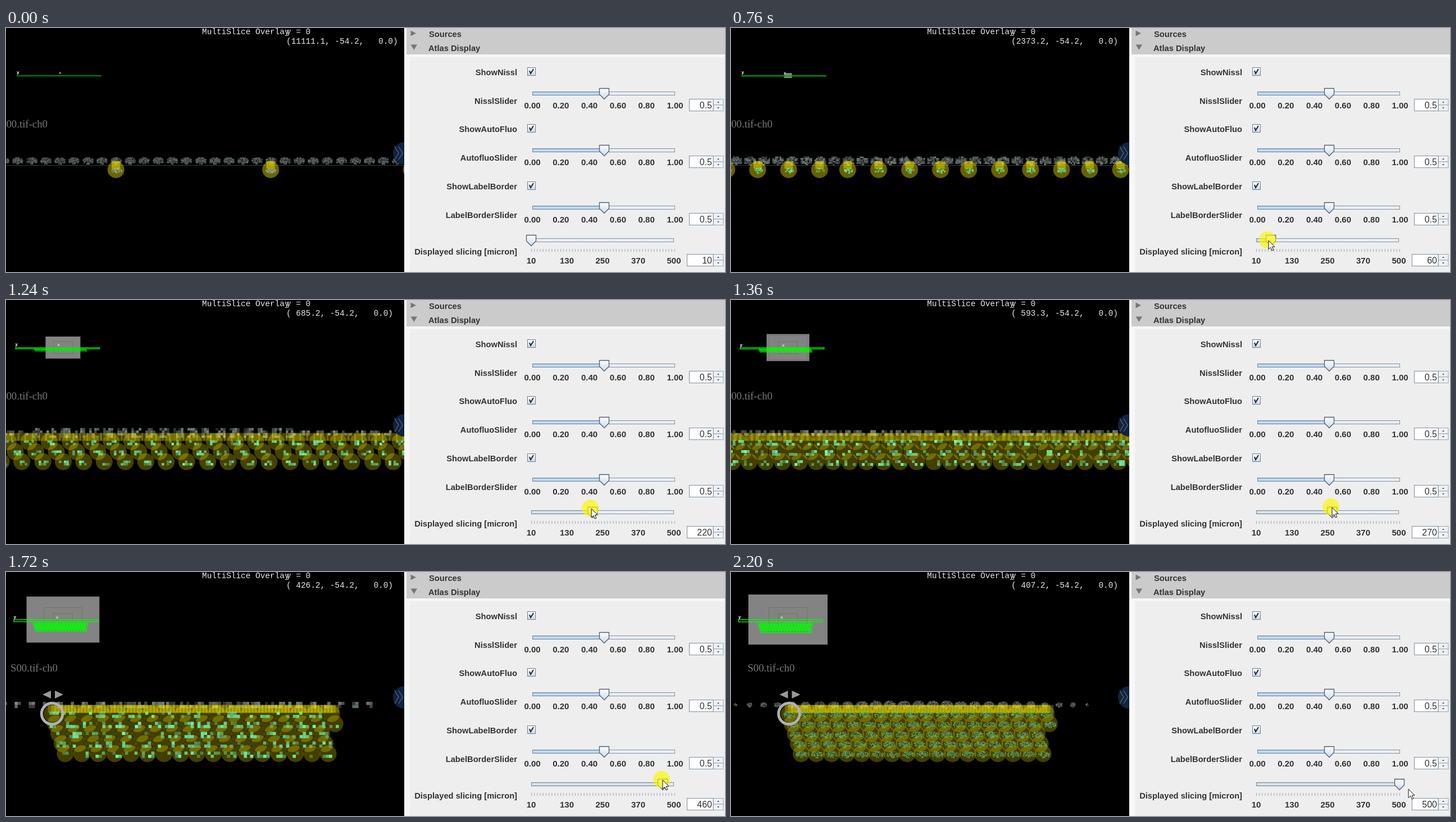
Animation of 1280 by 434 pixels, one loop 2.24 s. Source, as an HTML page with a canvas:

```html
<!DOCTYPE html>
<html lang="en">
<head>
<meta charset="utf-8">
<title>Slice spacing</title>
<style>
html, body { margin: 0; width: 100%; height: 100%; overflow: hidden; background: #fff; }
canvas, svg { position: absolute; left: 0; top: 0; display: block; }
text { white-space: pre; }
.mono { font: 14.4px "Liberation Mono", "Courier New", monospace; fill: #e8e8e8; }
.tiny { font: 8px "Liberation Mono", monospace; fill: #fff; }
.tag { font: 18.8px "Liberation Serif", "Times New Roman", serif; fill: #777; }
.bold { font: bold 14.7px "Liberation Sans", Arial, sans-serif; fill: #333; }
.tick { font: bold 15px "Liberation Sans", Arial, sans-serif; fill: #333; text-anchor: middle; }
.num { font: 16px "Liberation Sans", Arial, sans-serif; fill: #333; text-anchor: end; }
.end { text-anchor: end; }
</style>
</head>
<body>
<canvas id="view" width="710" height="434"></canvas>
<svg width="1280" height="434" viewBox="0 0 1280 434">
  <defs>
    <clipPath id="left"><rect width="710" height="434"/></clipPath>
    <linearGradient id="fill" x2="0" y2="1">
      <stop stop-color="#8fb2d6"/><stop offset=".5" stop-color="#cfe2f6"/><stop offset="1" stop-color="#a4c2e2"/>
    </linearGradient>
    <linearGradient id="pale" x2="0" y2="1">
      <stop stop-color="#b9c8cf"/><stop offset=".5" stop-color="#e3ebee"/><stop offset="1" stop-color="#b4c6cc"/>
    </linearGradient>
    <linearGradient id="face" x2="0" y2="1">
      <stop stop-color="#fff"/><stop offset="1" stop-color="#c6d8ea"/>
    </linearGradient>
    <path id="thumb" d="M-8.5-9.5H8.5V1L0 9.5L-8.5 1Z" fill="url(#face)" stroke="#53606e" stroke-width="1.3"/>
  </defs>
  <g clip-path="url(#left)">
    <text class="mono" x="349" y="11">MultiSlice Overlay</text>
    <text class="mono" x="499" y="11">y = 0</text>
    <text class="mono" x="499" y="28" id="pos"></text>
    <text class="tag" y="177" id="tag">S00.tif-ch0</text>
    <g class="tiny" id="axes"><text x="19" y="82">z</text><text x="19" y="81">y</text><text x="94" y="82">x</text></g>
    <g id="handle">
      <circle cy="252" r="18.7" fill="none" stroke="#b0b0b0" stroke-width="5"/>
      <path d="M-17 218l15-7v14zM20 218l-15-7v14z" fill="#999"/>
    </g>
    <circle cx="709" cy="223" r="20" fill="#11233f"/>
    <path d="M692 211l7 11.500-7 11.500M699 211l7 11.500-7 11.500" fill="none" stroke="#54637c" stroke-width="1.4"/>
  </g>
  <g id="panel"></g>
  <g id="mouse">
    <circle id="halo" cx="-2" cy="-1" r="15" fill="#fbf600" fill-opacity=".68"/>
    <path d="M0 0V15.500L3.700 12.200L6.200 18L8.800 16.900L6.300 11.200H11Z" fill="#fff" stroke="#111"/>
  </g>
</svg>
<script>
const $ = id => document.getElementById(id);
const g = $('view').getContext('2d');
const LOOP = 2240, STEP = 40, PITCH = 25.04;

// time, value
const SPIN = [[520, 10], [760, 60], [1080, 150], [1360, 270], [1720, 460], [1880, 500]];
const SPACING = [[520, 10], [760, 50], ...SPIN.slice(2)];
// time, x, y
const MOUSE = [[200, 1056, 406], [360, 932, 374], [520, 932, 374], [760, 957, 378], [1080, 1005, 374],
  [1360, 1070, 369], [1720, 1169, 370], [1880, 1191, 371], [2160, 1191, 371], [2200, 1206, 386]];
// time, cell size
const GRAIN = [[520, 1.6], [560, 2], [760, 2.6], [1080, 3.6], [1360, 5], [1720, 5.6]];
// spacing, view centre, first slice
const LAYOUT = [[10, 381, 21], [50, 355, 9], [150, 351, 11], [270, 358, 3], [460, 355.5, 21], [500, 355, 8]];
// spacing, opacity of the section marks
const ALPHA = [[10, 0.42], [50, 0.4], [150, 0.29], [270, 0.26]];

function at(keys, x, col = 1) {
  if (x <= keys[0][0]) return keys[0][col];
  for (let i = 1; i < keys.length; i++) {
    const a = keys[i - 1], b = keys[i];
    if (x <= b[0]) return a[col] + (b[col] - a[col]) * (x - a[0]) / (b[0] - a[0]);
  }
  return keys[keys.length - 1][col];
}
const round10 = v => Math.round(v / 10) * 10;
function hash(a, b, c) {
  const s = Math.sin(a * 127.1 + b * 311.7 + c * 74.7) * 43758.5453;
  return s - Math.floor(s);
}

// Static controls
const rect = (x, y, w, h, fill, stroke = 'none') =>
  `<rect x="${x}" y="${y}" width="${w}" height="${h}" fill="${fill}" stroke="${stroke}"/>`;
const text = (x, y, cls, s, id = '') => `<text x="${x}" y="${y}" class="${cls}" id="${id}">${s}</text>`;

function slider(x, y, id, fill, paint = 'fill') {
  return rect(x + 0.5, y - 3.5, 253, 6, '#e9edf2', '#8291a2') +
    `<rect id="${id}Fill" x="${x + 0.5}" y="${y - 3.5}" width="${fill}" height="6" fill="url(#${paint})" stroke="#7088a0"/>` +
    `<use id="${id}Thumb" href="#thumb" x="${x + fill}" y="${y}"/>`;
}
function spinner(x, y, s, id) {
  const bx = 1259.5;
  return rect(x + 0.5, y + 0.5, bx - x - 1, 21, '#fff', '#7f8fa3') + text(1257, y + 17, 'num', s, id) +
    rect(bx, y + 0.5, 17.5, 10.5, '#eef1f5', '#9aa8b8') + rect(bx, y + 11, 17.5, 10.5, '#eef1f5', '#9aa8b8') +
    `<path d="M1266 ${y + 7}h4l-2-2.500zM1266 ${y + 15}h4l-2 2.500z" fill="#555"/>`;
}
function buildPanel() {
  let s = rect(709, 0, 571, 434, '#fff') + rect(713, 0, 567, 47, '#cbcbcb') + rect(713, 47, 567, 387, '#f7f7f7') +
    rect(719, 52, 561, 382, '#eee') +
    '<path d="M720.500 4.500l9.500 5-9.500 5zM720.500 29.500h11.500l-5.700 9.500z" fill="#777"/>' +
    text(753, 15.5, 'bold', 'Sources') + text(752, 40.5, 'bold', 'Atlas Display');
  [['ShowNissl', 'NisslSlider'], ['ShowAutoFluo', 'AutofluoSlider'], ['ShowLabelBorder', 'LabelBorderSlider']]
    .forEach(([show, name], i) => {
      const y = Math.round(i * 101.3);
      s += text(910, 84 + y, 'bold end', show) + text(910, 134.5 + y, 'bold end', name) +
        rect(928.5, 70.5 + y, 14, 14, 'url(#face)', '#6d7f93') +
        `<path d="M932 ${76 + y}l2 5 5-8" fill="none" stroke="#222" stroke-width="2"/>` +
        slider(937, 117 + y, 's' + i, 128) + spinner(1216, 126 + y, '0.5', 'n' + i);
      for (let k = 0; k < 6; k++) s += text(937 + k * 50.8, 143 + y, 'tick', (k / 5).toFixed(2));
    });
  s += text(910, 403, 'bold end', 'Displayed slicing [micron]') + slider(935, 378, 'step', 0, 'pale') +
    spinner(1212, 402, '10', 'value');
  let ticks = '';
  for (let k = 0; k < 50; k++) ticks += `M${(935.5 + k * 5.2).toFixed(1)} 393v5`;
  s += `<path d="${ticks}" stroke="#9aa3ad"/>`;
  ['10', '130', '250', '370', '500'].forEach((v, k) => s += text(935 + k * 63.5, 418.5, 'tick', v));
  $('panel').innerHTML = s;
}

// Grainy brain cross-section built of square cells
function brain(x, y, w, h, q, seed, tint, keep) {
  const nx = Math.max(1, Math.round(w / q / 2)), ny = Math.max(1, Math.round(h / q / 2));
  const limit = q > 3 ? 1.15 : 1;
  for (let j = -ny; j < ny; j++) for (let i = -nx; i < nx; i++) {
    const a = (i + 0.5) / nx, b = (j + 0.5) / ny, d = Math.abs(a) ** 2.2 + Math.abs(b) ** 2.2;
    if (d > limit || (b > 0.5 && Math.abs(a) > 0.35 && Math.abs(a) < 0.65)) continue;
    if (hash(i, j, seed) > keep) continue;
    g.globalAlpha = 0.3 + 0.7 * hash(j, i, seed + 9);
    g.fillStyle = `rgb(${tint.map((c, k) => c * (0.88 + 0.24 * hash(i + k, j, seed + 3)))})`;
    g.fillRect(x + i * q, y + j * q, q, q);
  }
  g.globalAlpha = 1;
}

const unit = i => 11 * i - Math.floor(i / 4) - 502.4;

function overview(v) {
  const t = v / 500, s = 0.282 * v / 710;
  const frame = m => [101.4 - 0.141 * m, 84.6 - 0.089 * m, 0.282 * m, 0.178 * m];
  if (v > 10) {
    g.fillStyle = '#838383';
    g.fillRect(...frame(v));
  }
  g.lineWidth = 1;
  g.strokeStyle = '#6c7860';
  for (const m of [120, 240]) if (v > m) g.strokeRect(...frame(m));

  g.strokeStyle = `rgb(0,${Math.round(145 + 110 * Math.min(1, t * 2))},0)`;
  g.lineWidth = 1.3;
  g.strokeRect(19.5 - 6 * t, 84.8, 150 - t, 0.5 + 3.4 * t);
  g.lineWidth = Math.min(1.2, v / 300);
  const n = Math.ceil(v / 107.5);
  if (v > 50) for (let i = 0; i < 87; i++) {
    g.beginPath();
    g.arc(101 + unit(i) * 0.0995, 84.3 + (35 + i % n * 17.8) * s, 14 * s, 0, 7);
    g.stroke();
  }
}

function drawView(v, q, t) {
  g.fillStyle = '#000';
  g.fillRect(0, 0, 710, 434);
  overview(v);

  const mid = at(LAYOUT, v), first = at(LAYOUT, v, 2) - PITCH;
  const lo = 355 - 176000 / v, hi = 355 + 142000 / v;
  const coarse = q > 3, sharp = t > 2000;
  for (let x = first, k = 0; x < 725; x += PITCH, k++) {
    if (x < lo || x > hi) continue;
    const size = Math.sin(Math.PI * (x - lo) / (hi - lo)) ** 0.7;
    brain(Math.round(x), 236.5, 6 + 14.5 * size, 6 + 8 * size, q, k + v, [125, 137, 135], coarse ? 0.75 : 0.95);
  }
  if (v < 150) {
    g.fillStyle = '#333838';
    g.fillRect(0, 244, 710, 1);
  }

  const n = Math.ceil(v / 107.5), spots = [];
  for (let i = 0; i < 87; i++) {
    const x = mid + unit(i) * PITCH * 10 / v;
    if (x > -20 && x < 730) spots.push([x, 252 + (i + (n === 2)) % n * 17.8, i]);
  }
  g.fillStyle = `rgba(255,243,0,${at(ALPHA, v)})`;
  for (const [x, y] of spots) {
    g.beginPath();
    g.arc(x, y, 15, 0, 7);
    g.fill();
    g.fillRect(x - 7.5, 236.5, 15, 14);
  }
  const tint = v < 20 ? [165, 195, 200] : sharp ? [105, 185, 130] : [115, 240, 170];
  const keep = v < 20 ? 0.75 : q > 4.5 ? 0.45 : coarse ? 0.55 : 0.72;
  for (const [x, y, i] of spots)
    brain(Math.round(x + 1), Math.round(y + 2), sharp ? 22 : 18, sharp || q > 4.5 ? 12 : 9, q, i * 3 + v, tint, keep);

  const x0 = mid + unit(0) * PITCH * 10 / v;
  $('handle').setAttribute('transform', `translate(${x0})`);
  $('tag').setAttribute('x', Math.max(-10, x0 - 74));
  $('axes').setAttribute('transform', `translate(${-6 * v / 500} ${v / 500})`);
  $('pos').textContent = `(${(188.74 + 109224 / v).toFixed(1).padStart(6)}, -54.2,   0.0)`;
}

function render(t) {
  const value = round10(at(SPIN, t)), dx = (value - 10) / 490 * 255;
  $('value').textContent = value;
  $('stepThumb').setAttribute('x', 935 + dx);
  $('stepFill').setAttribute('width', Math.min(253, dx));
  $('mouse').setAttribute('transform', `translate(${at(MOUSE, t)} ${at(MOUSE, t, 2)})`);
  $('mouse').style.display = t < 200 ? 'none' : '';
  $('halo').style.display = t >= 520 && t < 2120 ? '' : 'none';
  drawView(round10(at(SPACING, t)), t > 2000 ? 1.5 : at(GRAIN, t), t);
}

buildPanel();
const start = performance.now();
let shown = -1;
function tick() {
  const t = Math.floor((performance.now() - start) % LOOP / STEP) * STEP;
  if (t !== shown) render(shown = t);
  requestAnimationFrame(tick);
}
tick();
</script>
</body>
</html>
```
